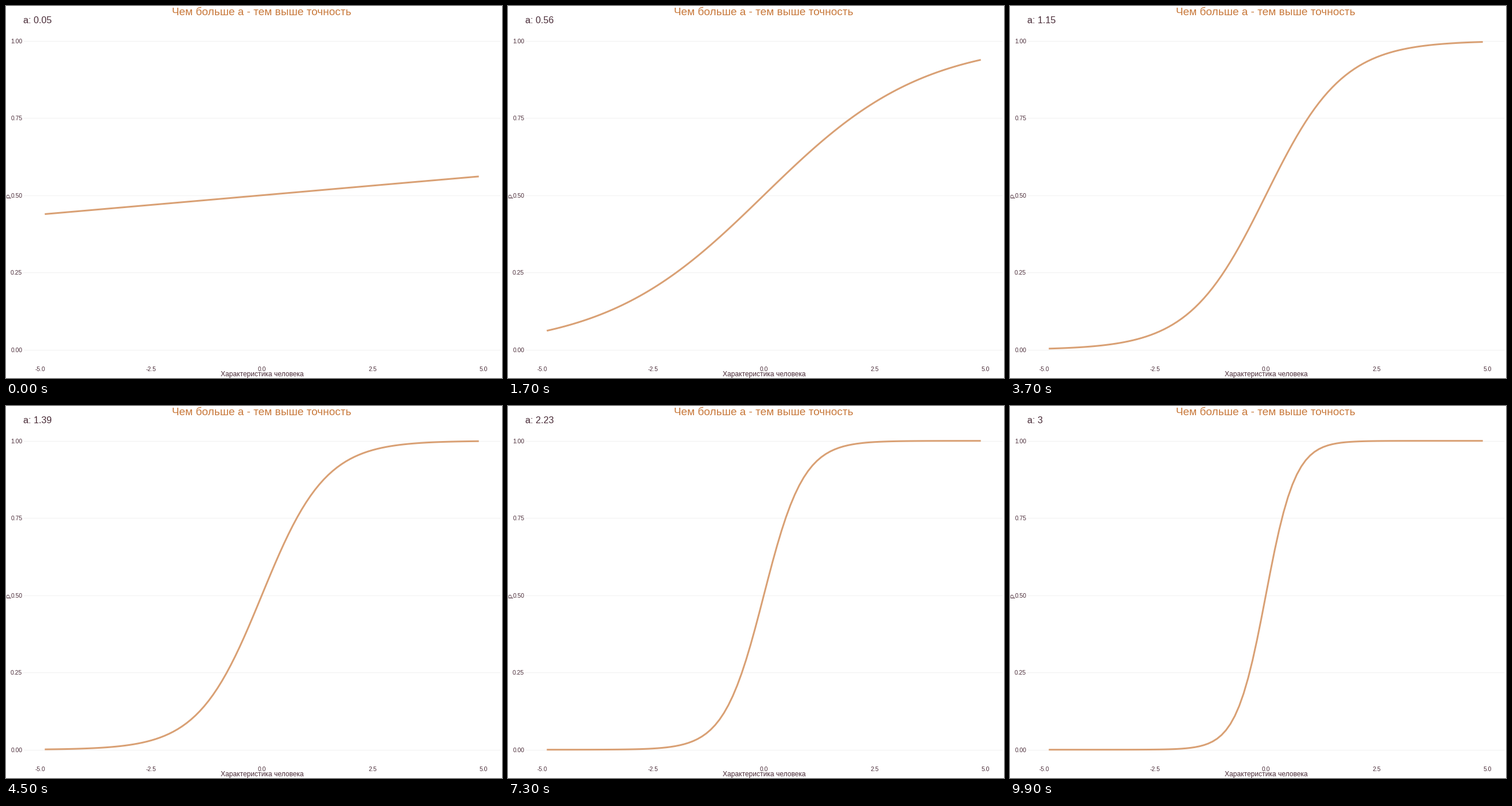
Recreate the animation shown at these times as a matplotlib script. Size 864 by 648 pixels, loop 10 s.

```python
import numpy as np
import matplotlib.pyplot as plt
from matplotlib.animation import FuncAnimation

W, H, DPI = 864, 648, 100
FRAMES, INTERVAL = 100, 100
A_MIN, A_MAX = 0.05, 3.0

DARK, TITLE, CURVE, GRID = "#4a2c38", "#c8783a", "#d9a074", "#f2f2f2"

plt.rcParams["font.family"] = "Liberation Sans"
plt.rcParams["path.simplify"] = False

fig = plt.figure(figsize=(W / DPI, H / DPI), dpi=DPI, facecolor="white")
ax = fig.add_axes([0, 0, 1, 1])
ax.set_xlim(0, W)
ax.set_ylim(H, 0)
ax.axis("off")


def to_x(v):
    return 445.6 + 77.15 * v


def to_y(p):
    return 598.7 - 538 * p


def label(x, y, text, px, color=DARK, ha="center", va="baseline", **kw):
    return ax.text(x, y, text, fontsize=px * 72 / DPI, color=color,
                   ha=ha, va=va, **kw)


for p in np.linspace(0, 1, 5):
    ax.plot([29.7, 861.3], [to_y(p)] * 2, color=GRID, lw=0.75,
            solid_capstyle="butt", zorder=1)
    label(28.3, to_y(p) + 4, f"{p:.2f}", 10.4, ha="right")

for v in np.linspace(-5, 5, 5):
    label(to_x(v), 635.5, f"{v:.1f}", 10.4)

label(445.5, 15.6, "Чем больше а - тем выше точность", 19, TITLE)
label(446, 645, "Характеристика человека", 12)
label(5.5, 330, "P", 11.5, va="center", rotation=90)
counter = label(29.5, 30.3, "", 16.2, ha="left")

theta = np.linspace(-4.9, 4.9, 99)
curve, = ax.plot([], [], color=CURVE, lw=3 * 72 / DPI, zorder=2,
                 solid_capstyle="butt", solid_joinstyle="round")


def update(i):
    a = A_MIN + (A_MAX - A_MIN) * i / (FRAMES - 1)
    curve.set_data(to_x(theta), to_y(1 / (1 + np.exp(-a * theta))))
    counter.set_text(f"a: {round(a, 2):g}")
    return curve, counter


anim = FuncAnimation(fig, update, frames=FRAMES, interval=INTERVAL,
                     init_func=lambda: update(0), repeat=True,
                     repeat_delay=0, blit=False)
plt.show()
```
